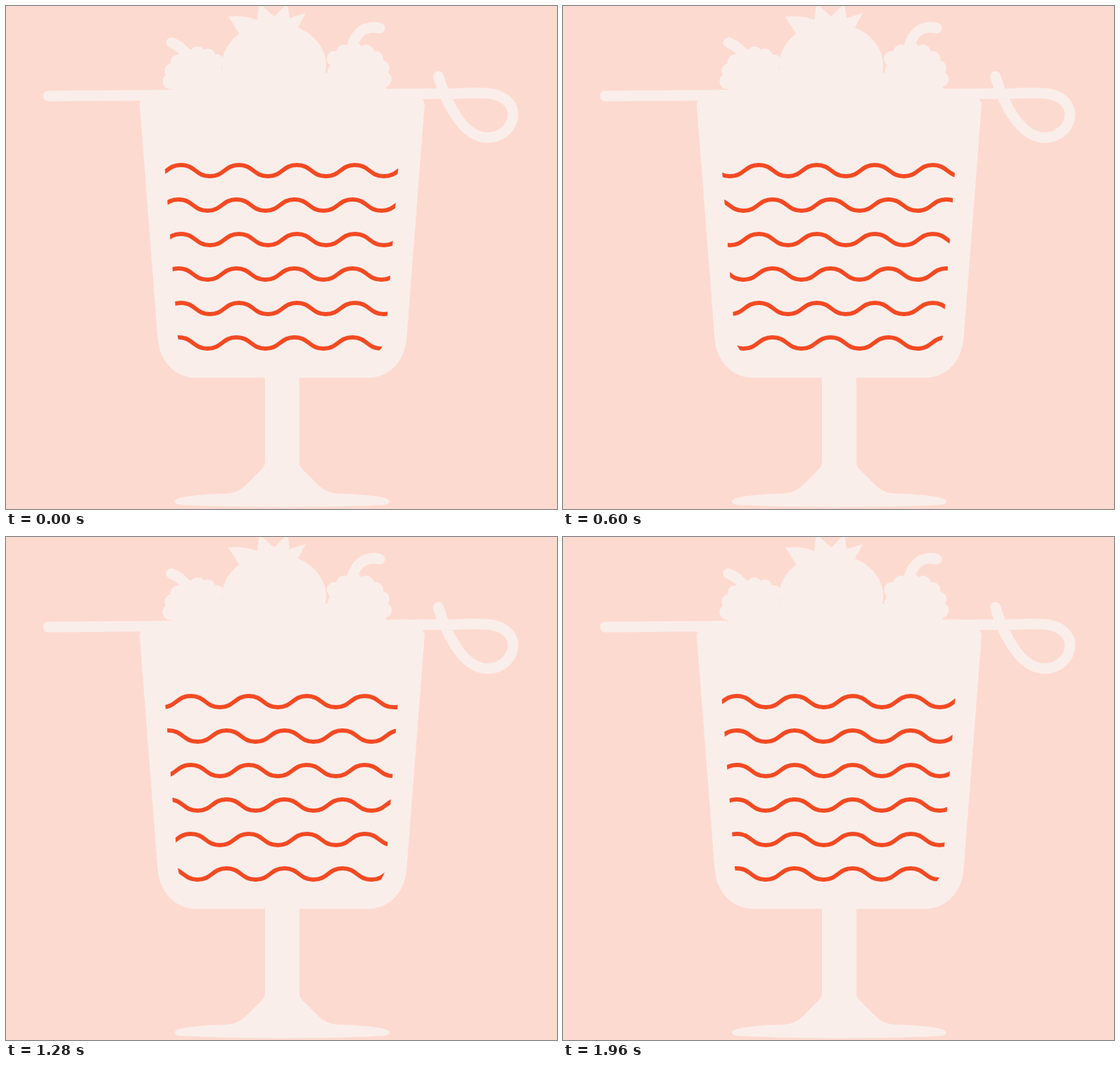
An HTML page that plays this animation: 783x715 px, repeating every 2000 ms.

```html
<!DOCTYPE html>
<html lang="en">
<head>
<meta charset="utf-8">
<title>Cocktail</title>
<style>
  html, body { margin: 0; width: 100%; height: 100%; overflow: hidden; background: #fddad0; }
  svg { display: block; }
  .pale { fill: #faeeea; }
  .stick { fill: none; stroke: #faeeea; stroke-width: 15; stroke-linecap: round; }
  #waves { fill: none; stroke: #f34a23; stroke-width: 6; }
</style>
</head>
<body>
<svg width="783" height="715" viewBox="0 0 783 715">
  <clipPath id="liquid">
    <path d="M224.6 215H558.4L539.7 470Q537 487 522 498H260Q246 487 244 470Z"/>
  </clipPath>

  <!-- skewer and fruit stems -->
  <g class="stick">
    <path d="M60 128L240 126.5"/>
    <path d="M540 125L640 124.5Q661 123 682 124C706 125 720.5 138 720.5 154C720 173 704 187 684 187C651 187 627 142 614.5 100"/>
    <path d="M235 52Q248 57 258 70"/>
    <path d="M491 60C497 36 511 27 531 31.500"/>
  </g>

  <g class="pale">
    <!-- half of the glass, mirrored for the other side -->
    <path id="half" d="M393 131H198Q190 132 190 141L215.5 472C218 505 240 528.500 271 528.500H368V648Q368 654 364 658L341 681Q330 692 314 693C280 694 240 697 240 704Q240 708 247 709Q310 712.500 393 712.500Z"/>
    <use href="#half" transform="matrix(-1 0 0 1 784.8 0)"/>
    <!-- strawberry with leaves -->
    <ellipse cx="381" cy="84" rx="74" ry="60"/>
    <path d="M332 40L316 15Q340 13 357 20L360 -4 381 15 400 -4 403 17 426 10 413 34Z"/>
    <path d="M240 95H540V135H240Z"/>
    <g id="berries"></g>
  </g>
  <g clip-path="url(#liquid)"><g id="waves"></g></g>
</svg>
<script>
const PERIOD = 82.4, LOOP = 2000, STEP = 40, CYCLES = 11.205;

const add = (parent, tag, attrs) => {
  const el = document.createElementNS('http://www.w3.org/2000/svg', tag);
  for (const k in attrs) el.setAttribute(k, attrs[k]);
  return parent.appendChild(el);
};

// A round core with bumps from its outer side over the top; side is -1 (left) or 1.
function berry(cx, cy, r, side) {
  const group = document.getElementById('berries');
  add(group, 'circle', { cx, cy, r });
  for (let i = 0; i < 7; i++) {
    const a = i * Math.PI / 8;
    add(group, 'circle', { cx: cx + side * r * Math.cos(a), cy: cy - r * Math.sin(a), r: 11 });
  }
}
berry(272, 107, 38.5, -1);
berry(496, 104, 41, 1);

const q = PERIOD / 4;
const wave = 'M0 -8' + `c${q} 0 ${q} 16 ${2 * q} 16s${q} -16 ${2 * q} -16`.repeat(7);
const waves = document.getElementById('waves');
const rows = Array.from({ length: 6 }, () => add(waves, 'path', { d: wave }));

// Alternate rows slide in opposite directions.
function draw(now) {
  const t = Math.floor(now % LOOP / STEP) * STEP;
  const turn = CYCLES * t / LOOP % 1;
  rows.forEach((row, i) => {
    const x = i % 2 ? 80.3 + (1 - turn) % 1 * PERIOD : 83.8 + turn * PERIOD;
    row.setAttribute('transform', `translate(${x} ${234 + 49 * i})`);
  });
}

const start = performance.now();
function tick() {
  draw(performance.now() - start);
  requestAnimationFrame(tick);
}
tick();
</script>
</body>
</html>
```
